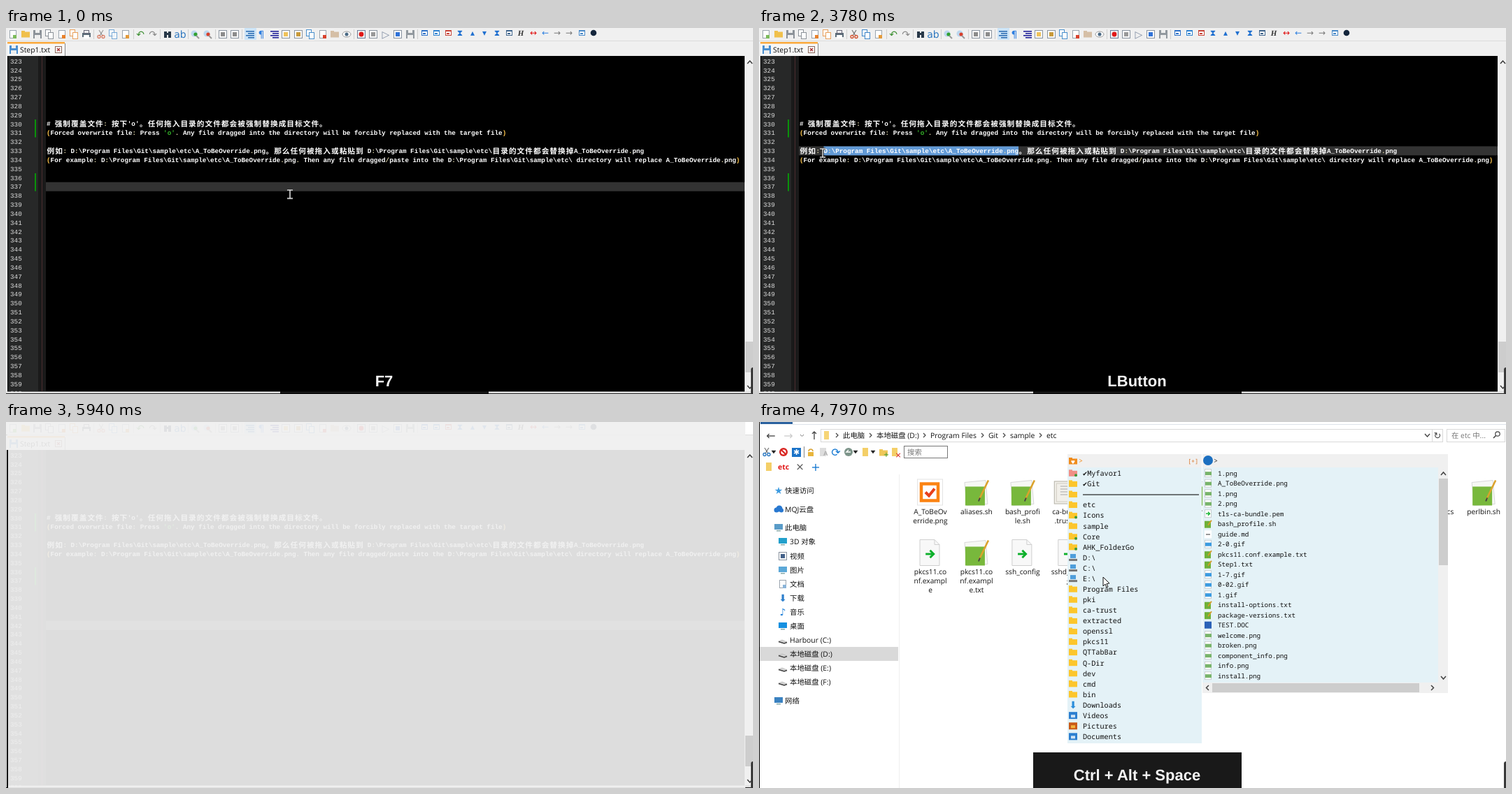
Recreate the animation shown at these times as an HTML page with a canvas. Size 1068x524 px, loop 8000 ms.

```html
<!DOCTYPE html>
<html lang="zh-CN">
<head>
<meta charset="utf-8">
<title>Screen demo</title>
<style>
html, body { margin: 0; width: 100%; height: 100%; overflow: hidden; background: #000; }
canvas { display: block; width: 1068px; height: 524px; }
</style>
</head>
<body>
<canvas id="stage" width="1068" height="524"></canvas>
<script>
const g = document.getElementById('stage').getContext('2d');
g.textRendering = 'geometricPrecision';
const LOOP = 8000;
const UI = '10.4px "Open Sans","Noto Sans CJK SC",sans-serif';
const FILE = '10.2px "Open Sans","Noto Sans CJK SC",sans-serif';
const SYMBOL = '"DejaVu Sans",sans-serif';
const LATIN = 'bold 9.29px "Liberation Mono",monospace';
const HAN = 'bold 10.7px "Noto Sans CJK SC",sans-serif';
const NUMBER = '9.29px "Liberation Mono",monospace';

// ---- drawing helpers ----
function rect(x, y, w, h, c) { g.fillStyle = c; g.fillRect(x, y, w, h); }
function frame(x, y, w, h, c) { g.strokeStyle = c; g.lineWidth = 1; g.strokeRect(x + .5, y + .5, w - 1, h - 1); }
function disc(x, y, r, c) { g.fillStyle = c; g.beginPath(); g.arc(x, y, r, 0, 7); g.fill(); }
function line(points, c, w = 1, fill) {
  g.beginPath();
  points.forEach(([x, y]) => g.lineTo(x, y));
  if (fill) { g.closePath(); g.fillStyle = fill; g.fill(); }
  g.strokeStyle = c; g.lineWidth = w; g.stroke();
}
function text(s, x, y, font, c, align = 'left') {
  g.font = font; g.fillStyle = c; g.textAlign = align; g.fillText(s, x, y);
}
const symbol = (s, x, y, size, c) => text(s, x, y + size * .36, size + 'px ' + SYMBOL, c, 'center');
function ease(t, a, b) {
  const k = Math.min(1, Math.max(0, (t - a) / (b - a)));
  return k * k * (3 - 2 * k);
}
function along(keys, t) {
  const i = keys.findIndex(k => k[0] > t);
  if (i === 0) return keys[0].slice(1);
  if (i < 0) return keys[keys.length - 1].slice(1);
  const a = keys[i - 1], b = keys[i], k = ease(t, a[0], b[0]);
  return [a[1] + (b[1] - a[1]) * k, a[2] + (b[2] - a[2]) * k];
}

const icons = {
  doc(x, y, c) {
    rect(x - 5, y - 6, 10, 12, '#fff'); frame(x - 5, y - 6, 10, 12, '#9aa4ae'); rect(x, y + 1, 5, 5, c);
  },
  docs(x, y, c) {
    for (const d of [-2, 2]) { rect(x - 4 + d, y - 5 + d, 8, 10, '#fff'); frame(x - 4 + d, y - 5 + d, 8, 10, c); }
  },
  folder(x, y, c) { rect(x - 6, y - 5, 5, 3, c); rect(x - 6, y - 3.5, 12, 8, c); },
  disk(x, y, c) { rect(x - 6, y - 6, 12, 12, c); rect(x - 3, y - 6, 6, 4, '#eee'); rect(x - 4, y + 1, 8, 5, '#eee'); },
  box(x, y, c) { rect(x - 6, y - 6, 12, 12, '#fafafa'); frame(x - 6, y - 6, 12, 12, '#8a94a0'); rect(x - 3, y - 3, 6, 6, c); },
  rec(x, y, c) { frame(x - 6, y - 6, 12, 12, '#6d7d99'); disc(x, y, 3.4, c); },
  rows(x, y, c) { for (let i = 0; i < 4; i++) rect(x - 6 + (i % 2) * 3, y - 5 + i * 3, 12 - (i % 2) * 3, 1.6, c); },
  lens(x, y, c) { disc(x - 1, y - 1, 4.5, '#bcd7ee'); disc(x + 1, y, 2.6, c); line([[x + 2, y + 2], [x + 6, y + 6]], '#999', 2); },
  grid(x, y, c) { rect(x - 4, y - 4, 9, 8, '#fff'); frame(x - 4, y - 4, 9, 8, c); rect(x - 4, y - 4, 9, 2, c); rect(x - 2, y, 4, 2, c); },
  print(x, y, c) { rect(x - 6, y - 2, 12, 6, c); frame(x - 4, y - 6, 8, 5, '#667'); rect(x - 4, y + 1, 8, 5, '#fff'); },
  cut(x, y, c) {
    line([[x - 3, y - 6], [x + 2, y + 2]], '#777', 1.3); line([[x + 3, y - 6], [x - 2, y + 2]], '#777', 1.3);
    for (const d of [-3, 3]) { g.beginPath(); g.arc(x + d, y + 3.5, 2, 0, 7); g.strokeStyle = c; g.stroke(); }
  },
  find(x, y, c) { rect(x - 5, y - 4, 4, 9, c); rect(x + 1, y - 4, 4, 9, c); rect(x - 2, y - 2, 4, 3, c); },
  dot(x, y, c) { disc(x, y, 4.3, c); },
  eye(x, y, c) {
    g.beginPath(); g.ellipse(x, y, 6, 4, 0, 0, 7); g.fillStyle = '#fff'; g.fill();
    g.strokeStyle = '#999'; g.lineWidth = 1; g.stroke(); disc(x, y, 2.5, c);
  },
  tile(x, y) { rect(x - 5, y - 4, 9, 10, '#6fb038'); line([[x, y + 2], [x + 5, y - 5]], '#d69b2c', 1.8); },
  drive(x, y) { rect(x - 4, y - 5, 8, 6, '#4e9edb'); rect(x - 6, y + 2, 12, 3, '#777'); },
  disk3d(x, y) {
    line([[x - 6, y + 2], [x - 1, y], [x + 6, y + 3], [x + 2, y + 5]], '#aaa', .6, '#d4d4d4');
    line([[x - 6, y + 2.5], [x + 2, y + 5], [x + 6, y + 3.5]], '#444', 1.6);
  },
  screen(x, y, c) { rect(x - 6, y - 5, 12, 8, c); rect(x - 3, y + 4, 6, 1.5, '#8aa'); },
  cloud(x, y, c) { disc(x - 3, y + 1, 3.5, c); disc(x + 1, y - 1, 4.5, c); disc(x + 4, y + 1.5, 3, c); },
};
function icon(kind, x, y, c, size = 14) {
  if (icons[kind]) icons[kind](x, y, c);
  else symbol(kind, x, y, size, c);
}

// ---- editor ----
const PATH = 'D:\\Program Files\\Git\\sample\\etc\\', PNG = 'A_ToBeOverride.png';
const CODE = {
  330: "# 强制覆盖文件: 按下'o'。任何拖入目录的文件都会被强制替换成目标文件。",
  331: "(Forced overwrite file: Press 'o'. Any file dragged into the directory will be forcibly replaced with the target file)",
  333: `例如: ${PATH}${PNG}。那么任何被拖入或粘贴到 ${PATH}目录的文件都会替换掉${PNG}`,
  334: `(For example: ${PATH}${PNG}. Then any file dragged/paste into the ${PATH} directory will replace ${PNG})`,
};
const LEFT = 58, STEP = 12.835;
const lineY = n => 47.5 + (n - 323) * STEP;
const lineAt = y => Math.round((y - 47.5) / STEP) + 323;
const runs = s => s.match(/[^\x00-\xff]+|'o'|[():.\/]|[^():.\/'\u0100-\uffff]+/g) || [];

// Walks through a line in runs of one script and returns its right end.
function eachRun(s, draw) {
  let x = LEFT;
  for (const run of runs(s)) {
    const han = run.charCodeAt(0) > 255;
    g.font = han ? HAN : LATIN;
    g.letterSpacing = han ? '1px' : '0px';
    const w = g.measureText(run).width;
    if (draw) draw(run, x, han);
    x += w;
  }
  g.letterSpacing = '0px';
  return x;
}
const endX = s => eachRun(s);
function snapX(s, x) {
  let best = LEFT;
  for (let i = 1; i <= s.length; i++) {
    const e = endX(s.slice(0, i));
    if (e > x + 3) break;
    best = e;
  }
  return best;
}
function drawCode(n) {
  eachRun(CODE[n], (run, x, han) => {
    const c = run === "'o'" && n === 331 ? '#35b52a' : /^[()]$/.test(run) ? '#ffc64a' : /^[:.\/]$/.test(run) ? '#e6dcae' : '#fff';
    text(run, x + (han ? .5 : 0), lineY(n) + (han ? 3.9 : 3), han ? HAN : LATIN, c);
  });
}

const TOOLS = [
  ['doc', 10, '#7cbb5b'], ['folder', 28, '#f0c04c'], ['disk', 45, '#8c9299'], ['docs', 62, '#8c9299'], ['doc', 80, '#e8812c'],
  ['docs', 97, '#e8a05c'], ['print', 115, '#5b6b78'], ['cut', 136, '#d2502d'], ['docs', 153, '#3f86c8'], ['doc', 171, '#e39a3b'],
  ['↶', 192, '#3c8f31'], ['↷', 210, '#888'], ['find', 231, '#283848'], ['ab', 249, '#2f78c0'], ['lens', 270, '#2fa02f'],
  ['lens', 288, '#d8402c'], ['box', 310, '#8c8c8c'], ['box', 327, '#8c8c8c'], ['rows', 349, '#2f6fb5'], ['¶', 365, '#2f7fe0'],
  ['rows', 384, '#23239a'], ['box', 400, '#efc25a'], ['box', 418, '#c89a3a'], ['docs', 435, '#4a90cc'], ['doc', 453, '#d8432e'],
  ['folder', 470, '#d5bfa6'], ['eye', 487, '#4a6a85'], ['rec', 508, '#e01818'], ['box', 525, '#999'], ['▷', 543, '#7d8aa0'],
  ['box', 560, '#2f72d8'], ['disk', 578, '#92999f'], ['grid', 598, '#2f72c8'], ['grid', 615, '#2f82d0'], ['grid', 632, '#c84438'],
  ['⧗', 649, '#2070d0'], ['▴', 667, '#2070d0'], ['▾', 684, '#2070d0'], ['⧗', 702, '#2070d0'], ['grid', 719, '#40658c'],
  ['H', 736, '#333'], ['↔', 754, '#e01010'], ['←', 771, '#2f80e0'], ['→', 788, '#777'], ['→', 805, '#777'],
  ['grid', 823, '#4a8ac8'], ['dot', 840, '#14263c'],
];
function toolbar(selected) {
  rect(0, 0, 1068, 40, '#f0f0f0');
  rect(0, 18, 1068, 1, '#dcdcdc');
  rect(341, 0, 17, 17, '#cce4f7');
  for (const x of [125, 182, 220, 260, 299, 337, 497, 588]) rect(x, 2, 1, 14, '#cfcfcf');
  for (const [kind, x, c] of TOOLS) {
    const late = x > 590;
    g.globalAlpha = (kind === 'cut' || x === 153) && !selected ? .7 : 1;
    if (kind === 'H') text('H', x, 11, 'italic bold 11px "Liberation Serif",serif', c, 'center');
    else icon(kind, x, late ? 7 : 9, c, late ? 12 : 14);
  }
  g.globalAlpha = 1;
  rect(2, 20, 82, 20, '#f7f7f7'); rect(2, 20, 82, 2.5, '#faa83a'); rect(84, 22, 1, 18, '#888');
  icons.disk(11, 31, '#4a8fd0');
  text('Step1.txt', 20, 34.5, UI, '#111');
  frame(70, 26, 10, 10, '#8d6a5c');
  line([[73, 29], [77, 33]], '#a33', 1.3); line([[77, 29], [73, 33]], '#a33', 1.3);
}

const EDIT_MOUSE = [
  [0, 406, 238], [190, 406, 238], [550, 590, 204], [960, 714, 229], [1010, 714, 229], [1400, 38, 117], [1670, 38, 117],
  [1880, 330, 236], [1980, 330, 236], [2430, 372, 178], [2480, 372, 178], [3220, 91, 179], [3780, 91, 179],
  [4440, 348, 294], [4650, 348, 294], [4990, 345, 536],
];
const PRESSES = [[1010, 1670], [1880, 1950], [2480, 3290], [4440, 4600]];

// Both selections stop growing when their drag ends; returns whether any text is selected.
function selectionBars(t) {
  const bar = (n, a, b) => rect(a, lineY(n) - 6.4, Math.min(b, 1056) - a, 12.9, '#629ad6');
  if (t >= 1010 && t < 1880) {
    const [x, y] = along(EDIT_MOUSE, Math.min(t, 1400)), top = lineAt(y);
    for (let n = top; n < 337; n++) {
      const s = CODE[n] || '';
      bar(n, n === top ? snapX(s, x) : LEFT, endX(s) + 5.6);
    }
    return true;
  }
  if (t >= 2480 && t < 4440) {
    const s = CODE[333], end = endX(s.slice(0, s.indexOf('。')));
    const [x] = along(EDIT_MOUSE, Math.min(t, 3220));
    bar(333, Math.min(end, snapX(s, x)), end);
    return true;
  }
  return false;
}

function editor(t) {
  const mouse = along(EDIT_MOUSE, t);
  rect(0, 40, 1068, 484, '#000');
  rect(3, 40, 43, 480, '#272828'); rect(46, 40, 11, 480, '#1a1a1a'); rect(51, 40, 1, 480, '#4a2c2e');
  const current = t < 1010 ? 337 : t < 1880 ? lineAt(along(EDIT_MOUSE, Math.min(t, 1400))[1]) : t < 2480 ? 338 : t < 4440 ? 333 : 342;
  rect(57, lineY(current) - 6.5, 999, 13, '#333');
  const selected = selectionBars(t);
  for (let n = 323; n <= 360; n++) text(n, 6, lineY(n) + 3.2, NUMBER, '#dcdcdc');
  rect(41, 131, 2, 25.5, '#0a930a'); rect(41, 208, 2, 25.5, '#0a930a');
  Object.keys(CODE).forEach(n => drawCode(+n));
  toolbar(selected);
  rect(0, 40, 2, 484, '#e8e8e8'); rect(2, 40, 1, 480, '#000');
  scrollEdge();
  rect(0, 520.5, 1068, 2.5, '#e0e0e0'); rect(0, 523, 1068, 1, '#222');
  for (const [down, up] of PRESSES) {
    const a = t < down ? 0 : 1 - ease(t, up, up + 180);
    if (a) disc(mouse[0] - 1, mouse[1] - 1, 10, `rgba(200,188,20,${a * .82})`);
  }
  if (t < 4990) iBeam(...mouse);
}
function scrollEdge() {
  rect(1056, 40, 12, 481, '#f0f0f0'); rect(1057, 449, 11, 44, '#cdcdcd');
  line([[1060, 51], [1063.5, 47], [1067, 51]], '#333', 1.4);
  line([[1060, 512], [1063.5, 516], [1067, 512]], '#333', 1.4);
}
function iBeam(x, y) {
  for (const [c, w] of [['#222', 3], ['#fff', 1.2]]) {
    line([[x, y - 6], [x, y + 6]], c, w);
    for (const d of [-6, 6]) line([[x - 4, y + d], [x + 4, y + d]], c, w);
  }
}
function arrow(x, y) {
  const shape = [[0, 0], [0, 13], [3, 10], [5, 15], [7, 14], [5, 9.5], [9, 9], [0, 0]];
  line(shape.map(([dx, dy]) => [x + dx, y + dy]), '#111', 1, '#fff');
}

// ---- file manager ----
const SIDE = [
  ['快速访问', 98, '★', '#3d9be0'], ['MQJ云盘', 125, 'cloud', '#2878d0'], ['此电脑', 151, 'screen', '#5a9cc8'],
  ['3D 对象', 171, 'screen', '#22a0cc'], ['视频', 192, 'box', '#44628a'], ['图片', 212, 'screen', '#5ba8d8'], ['文档', 232, 'doc', '#8ab4d8'],
  ['下载', 252, '⬇', '#2d7fcc'], ['音乐', 272, '♪', '#1f7fd8'], ['桌面', 292, 'screen', '#1590e0'], ['Harbour (C:)', 312, 'disk3d'],
  ['本地磁盘 (D:)', 332, 'disk3d'], ['本地磁盘 (E:)', 352, 'disk3d'], ['本地磁盘 (F:)', 372, 'disk3d'], ['网络', 399, 'screen', '#3b82c0'],
];
const FILES = [
  'A_ToBeOv|erride.png', 'aliases.sh', 'bash_profi|le.sh', 'ca-bundle|.trust.crt', 'cacerts', 'email-ca-|bundle.pe|m', 'env.sh',
  'git-promp|t.sh', 'lang.sh', 'moduli', 'objsign-ca|-bundle.p|em', 'perlbin.cs|h', 'perlbin.sh',
  'pkcs11.co|nf.exampl|e', 'pkcs11.co|nf.exampl|e.txt', 'ssh_config', 'sshd_confi|g', 'tls-ca-bun|dle.pem',
];

function greenArrow(x, y, s) {
  line([[x - 6 * s, y], [x + 4 * s, y]], '#0db02b', 2.8 * s);
  line([[x, y - 5 * s], [x + 5 * s, y], [x, y + 5 * s]], '#0db02b', 2.8 * s);
}
function bigIcon(name, x, y) {
  if (name.endsWith('.png')) {
    rect(x - 19, y - 20, 37, 38, '#fff'); frame(x - 19, y - 20, 37, 38, '#e4e4e4');
    g.strokeStyle = '#fb8312'; g.lineWidth = 4.5; g.strokeRect(x - 13, y - 13, 24, 24);
    line([[x - 7, y - 1], [x - 2, y + 4], [x + 6, y - 6]], '#e8401c', 4);
  } else if (/\.(sh|txt)$/.test(name)) {
    line([[x - 17, y - 15], [x + 13, y - 18], [x + 16, y + 16], [x - 14, y + 18]], '#d8d8d8', 1, '#f6f8f4');
    rect(x - 16, y - 9, 28, 27, '#78b83c');
    line([[x + 4, y + 9], [x + 17, y - 18]], '#dba22c', 2.6);
    line([[x + 3, y + 12], [x + 5, y + 7]], '#444', 2);
  } else if (name.endsWith('.crt')) {
    rect(x - 21, y - 17, 40, 33, '#f2f0ea'); frame(x - 21, y - 17, 40, 33, '#b5b2a8'); frame(x - 18, y - 14, 34, 27, '#cfccc2');
    for (let i = 0; i < 4; i++) rect(x - 12, y - 10 + i * 4, 22, 1, '#aaa');
    line([[x + 4, y + 10], [x + 1, y + 18]], '#2c75cc', 4); line([[x + 9, y + 10], [x + 12, y + 18]], '#2c75cc', 4);
    disc(x + 6, y + 5, 7, '#d89a20'); disc(x + 6, y + 5, 3.5, '#f6cf62');
  } else {
    line([[x - 15, y - 19], [x + 6, y - 19], [x + 13, y - 12], [x + 13, y + 18], [x - 15, y + 18], [x - 15, y - 19]], '#cfcfcf', 1, '#f8f8f8');
    line([[x + 6, y - 19], [x + 6, y - 12], [x + 13, y - 12]], '#cfcfcf');
    greenArrow(x - .5, y + 1.5, 1.05);
  }
}
function files(hover) {
  if (hover) rect(477, 165, 62, 72, `rgba(229,243,255,${hover})`);
  FILES.forEach((label, i) => {
    const row = i > 12 ? 1 : 0, x = 245 + (i - row * 13) * 65.93, y = 101.5 + row * 86;
    bigIcon(label.replace(/\|/g, ''), x, y);
    label.split('|').forEach((s, k) => text(s, x, y + 30 + k * 13.4, FILE, '#111', 'center'));
  });
}
function chromeRows() {
  rect(2, 0, 46, 3, '#2c629f'); rect(48, 3, 1020, 1, '#dde3ea');
  [['←', 17, '#444'], ['→', 42, '#ccc'], ['↑', 79, '#444']].forEach(([s, x, c]) => symbol(s, x, 19, 16, c));
  line([[59, 18], [61.5, 20.5], [64, 18]], '#777');
  frame(88, 10, 890, 19, '#d9d9d9'); frame(983, 10, 84, 19, '#d9d9d9'); rect(962, 10, 1, 19, '#d9d9d9');
  rect(93, 13, 7, 12, '#f6d576');
  const crumbs = [['此电脑', 120], ['本地磁盘 (D:)', 168], ['Program Files', 245], ['Git', 328], ['sample', 359], ['etc', 411]];
  for (const [s, x] of crumbs) {
    text(s, x, 22.8, UI, '#111');
    line([[x - 10, 16], [x - 7, 19], [x - 10, 22]], '#444', 1.2);
  }
  line([[952, 17], [955.5, 21], [959, 17]], '#444', 1.4);
  symbol('↻', 970, 19, 13, '#444');
  text('在 etc 中...', 990, 22.8, UI, '#777');
  g.beginPath(); g.arc(1056, 17, 3.2, 0, 7); g.strokeStyle = '#444'; g.lineWidth = 1.2; g.stroke();
  line([[1053.5, 19.5], [1050, 23]], '#444', 1.6);

  icons.cut(11, 43, '#2675c0');
  disc(35, 43, 6, '#d8231f'); disc(35, 43, 3.6, '#fff'); line([[32, 40], [38, 46]], '#d8231f', 2.2);
  rect(47, 37, 13, 13, '#1b73c8'); symbol('✱', 53.5, 43, 11, '#fff');
  rect(64, 35, 1, 16, '#888');
  rect(70, 43, 8, 6, '#e8b53c'); g.beginPath(); g.arc(74, 42, 3, 3.14, 0); g.strokeStyle = '#d9a336'; g.lineWidth = 1.6; g.stroke();
  rect(87, 37, 9, 12, '#ddd'); text('A', 92, 48, 'bold 9px "Liberation Sans",sans-serif', '#aaa');
  symbol('⟳', 110, 43, 16, '#1679d2');
  disc(128, 43, 6, '#7c9489'); line([[131, 43], [125, 43], [128, 40]], '#fff', 1.4);
  rect(148, 37, 8, 12, '#f4cf68'); icons.folder(178, 44, '#efc759'); rect(190, 37, 8, 12, '#f4cf68');
  symbol('+', 182, 46, 10, '#2c9a35'); symbol('×', 199, 47, 11, '#d01c1c');
  for (const x of [21, 138, 163]) line([[x - 3, 41], [x + 3, 41], [x, 45]], '#222', .5, '#222');
  frame(207, 34, 63, 18, '#777'); text('搜索', 212, 47, UI, '#777');
  rect(10, 58, 8, 12, '#f4cf68');
  text('etc', 27, 67.6, 'bold ' + UI, '#e01414');
  symbol('×', 58.5, 64, 15, '#555'); symbol('+', 81, 64, 16, '#1276d0');
}
const FILE_MOUSE = [[6250, 400, 530], [6610, 476, 266], [6700, 483, 258], [7420, 483, 258], [7700, 492, 222]];
function explorer(t) {
  const menu = t >= 7840;
  rect(0, 0, 1068, 524, '#fff'); rect(0, 0, 1, 524, '#000');
  chromeRows();
  rect(1, 322, 198, 20, '#d9d9d9');
  for (const [s, y, kind, c] of SIDE) {
    const child = y > 160 && y < 390;
    icon(kind, child ? 34 : 28, y, c);
    text(s, child ? 44 : 37, y + 3.8, UI, '#111');
  }
  if (menu) rect(200, 75, 1, 449, '#eee');
  else frame(202, 74, 870, 448, '#d4d4d4');
  const hover = t < 6520 ? 0 : t < 7200 ? 1 - ease(t, 6920, 7200) : ease(t, 7540, 7640);
  if (t >= 6080) files(hover);
  if (menu) favourites();
  if (t >= 7900) recent();
  const glow = t < 6680 ? 0 : 1 - ease(t, 6910, 7060);
  if (glow) disc(482, 257.5, 10, `rgba(255,92,92,${glow * .75})`);
  if (t >= 6250) arrow(...along(FILE_MOUSE, t));
}

// ---- popup menus ----
const FOLDERS = ['✔Myfavor1', '✔Git', '', 'etc', 'Icons', 'sample', 'Core', 'AHK_FolderGo', 'D:\\', 'C:\\', 'E:\\', 'Program Files',
  'pki', 'ca-trust', 'extracted', 'openssl', 'pkcs11', 'QTTabBar', 'Q-Dir', 'dev', 'cmd', 'bin', 'Downloads', 'Videos', 'Pictures', 'Documents'];
const RECENT = ['1.png', PNG, '1.png', '2.png', 'tls-ca-bundle.pem', 'bash_profile.sh', 'guide.md', '2-0.gif', 'pkcs11.conf.example.txt',
  'Step1.txt', '1-7.gif', '0-02.gif', '1.gif', 'install-options.txt', 'package-versions.txt', 'TEST.DOC', 'welcome.png', 'broken.png',
  'component_info.png', 'info.png', 'install.png'];
const mono = size => `${size}px "Noto Sans Mono","DejaVu Sans Mono",monospace`;

function favourites() {
  rect(441, 46, 192, 19, '#f0f0f0'); rect(441, 65, 192, 395, '#e4f2f7');
  icons.folder(449, 56, '#f08c1c'); symbol('♥', 449, 57, 7, '#fff');
  text('>', 457, 59, mono(10), '#f08c1c'); text('[+]', 613, 59, mono(8.5), '#d9762a');
  FOLDERS.forEach((s, i) => {
    const y = 73.3 + i * 15.08;
    if (/^.:/.test(s)) icons.drive(449, y);
    else if (s === 'Downloads') symbol('⬇', 449, y, 14, '#2a8ddb');
    else if (i > 22) { rect(443, y - 5, 12, 10, i === 24 ? '#c95a18' : '#2c7fd0'); rect(446, y - 1, 6, 4, i === 24 ? '#f3b43c' : '#cfe4f5'); }
    else {
      icons.folder(449, y, i ? '#fcc62c' : '#f08f86');
      if ([0, 4, 6, 7].includes(i)) disc(453, y + 3, 2, '#3a9a3a');
    }
    if (s) text(s, 463, y + 3.8, mono(10.2), '#111');
    else rect(463, y, 166, 1.2, '#222');
  });
}
function recentIcon(s, y) {
  const x = 642, ext = s.split('.').pop();
  if (ext === 'txt' || ext === 'sh') icons.tile(x, y);
  else if (ext === 'DOC') rect(x - 5, y - 5, 10, 10, '#2b62b8');
  else if (ext === 'md') { rect(x - 5, y - 5, 10, 11, '#fff'); rect(x - 3, y, 6, 1.5, '#777'); }
  else {
    rect(x - 5, y - 6, 10, 12, '#fff'); frame(x - 5, y - 6, 10, 12, '#c6ccd0');
    if (ext === 'pem') greenArrow(x, y, .5);
    else rect(x - 4, y - 2, 9, 5, ext === 'gif' ? '#3b9be0' : '#78b46a');
  }
}
function recent() {
  rect(634, 46, 351, 342, '#f0f0f0'); rect(634, 65, 337, 308, '#e4f2f7');
  disc(642, 55, 7, '#1c6fc0'); text('>', 650, 59, mono(10), '#333');
  rect(972, 81, 13, 124, '#cdcdcd'); rect(648, 374, 296, 13, '#cdcdcd');
  line([[975, 76], [978.5, 72], [982, 76]], '#444', 1.5); line([[975, 364], [978.5, 368], [982, 364]], '#444', 1.5);
  line([[643, 377], [639.5, 380.5], [643, 384]], '#444', 1.5); line([[961, 377], [964.5, 380.5], [961, 384]], '#444', 1.5);
  RECENT.forEach((s, i) => {
    const y = 73.2 + i * 14.5;
    recentIcon(s, y);
    text(s, 656, y + 3.5, mono(9.26), '#111');
  });
}

// ---- key caption and timeline ----
function caption(t) {
  const s = t < 1010 ? 'F7' : t < 5410 ? 'LButton' : t < 7000 ? '' : t < 7220 ? 'Ctrl' : t < 7420 ? 'Ctrl + Alt' : 'Ctrl + Alt + Space';
  if (!s) return;
  rect(392, 473, 298, 51, 'rgba(0,0,0,.9)');
  text(s, 540.5, 513, 'bold 22px "Liberation Sans",Arial,sans-serif', '#f4f4f4', 'center');
}
function render(t) {
  if (t < 6010) {
    editor(t);
    if (t >= 5810) {
      rect(2, 0, 1055, 524, `rgba(240,240,240,${t < 5870 ? .45 : .92})`);
      rect(1057, 0, 11, 18, '#fff');
      rect(1, 40, 2, 484, '#111');
    }
  } else explorer(t);
  g.fillStyle = '#3a3a3a';
  g.beginPath(); g.roundRect(1065, 486, 8, 44, 3); g.fill();
  caption(t);
}
const start = performance.now();
function tick() {
  render((performance.now() - start) % LOOP);
  requestAnimationFrame(tick);
}
tick();
</script>
</body>
</html>
```
